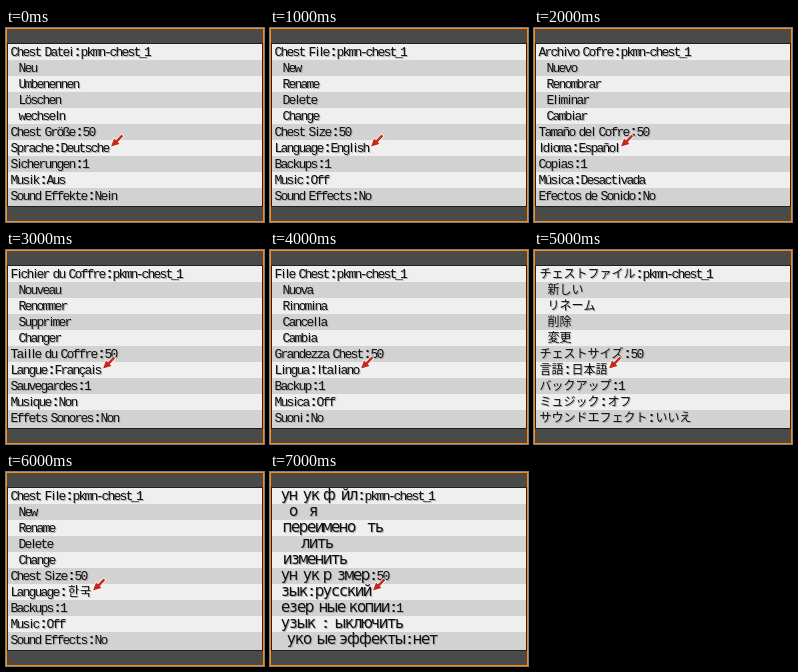
These frames come from a looping animation (258 px wide and 194 px high, 8000 ms). An HTML page with a canvas:

```html
<!DOCTYPE html>
<html lang="en">
<head>
<meta charset="utf-8">
<style>
  html, body { margin: 0; width: 100%; height: 100%; overflow: hidden; background: #4a4a4a; }
  canvas { display: block; width: 100vw; height: 100vh; }
</style>
</head>
<body>
<canvas id="stage" width="258" height="194"></canvas>
<script>
const ctx = document.getElementById('stage').getContext('2d');
const STEP = 1000, ROW = 16, LANGUAGE_ROW = 6;

const english = language => `Chest File:pkmn-chest_1
  New
  Rename
  Delete
  Change
Chest Size:50
Language:${language}
Backups:1
Music:Off
Sound Effects:No`;

// "~" is an empty cell, standing for a letter the menu font lacks.
const menus = [
`Chest Datei:pkmn-chest_1
  Neu
  Umbenennen
  Löschen
  wechseln
Chest Größe:50
Sprache:Deutsche
Sicherungen:1
Musik:Aus
Sound Effekte:Nein`,
english('English'),
`Archivo Cofre:pkmn-chest_1
  Nuevo
  Renombrar
  Eliminar
  Cambiar
Tamaño del Cofre:50
Idioma:Español
Copias:1
Música:Desactivada
Efectos de Sonido:No`,
`Fichier du Coffre:pkmn-chest_1
  Nouveau
  Renommer
  Supprimer
  Changer
Taille du Coffre:50
Langue:Français
Sauvegardes:1
Musique:Non
Effets Sonores:Non`,
`File Chest:pkmn-chest_1
  Nuova
  Rinomina
  Cancella
  Cambia
Grandezza Chest:50
Lingua:Italiano
Backup:1
Musica:Off
Suoni:No`,
`チェストファイル:pkmn-chest_1
  新しい
  リネーム
  削除
  変更
チェストサイズ:50
言語:日本語
バックアップ:1
ミュジック:オフ
サウンドエフェクト:いいえ`,
english('한국'),
`~ун~ук ф~йл:pkmn-chest_1
  ~о~~я
  переимено~~ть
  ~~~лить
  изменить
~ун~ук р~змер:50
~зык:русский
~езер~ные копии:1
~узык~:~ыключить
~~уко~ые эффекты:нет`
].map(menu => menu.split('\n'));

const MONO = '13px "Liberation Mono", monospace';
const SANS = '13px "Liberation Sans", sans-serif';
const BOLD = 'bold 14px "Liberation Sans", sans-serif';
const CYRILLIC = '15px "DejaVu Sans", sans-serif';
const CJK = '12px "Noto Sans CJK JP", "Noto Sans CJK KR", sans-serif';

// Cell width and font for each class of character; the first match wins.
const cells = [
  [/:/, 8, BOLD],
  [/[ilIí ]/, 4, SANS],
  [/[-_1]/, 5, MONO],
  [/ф/, 12, CYRILLIC],
  [/[ыю]/, 10, CYRILLIC],
  [/[а-я]/, 8, CYRILLIC],
  [/[\u3000-\uffff]/, 12, CJK],
  [/./, 6, MONO]
];

function drawLine(text, x, baseline) {
  for (const char of text) {
    const [, width, font] = cells.find(([pattern]) => pattern.test(char));
    if (char !== '~' && char !== ' ') {
      const center = x + (width - 1) / 2;
      ctx.font = font;
      ctx.fillStyle = '#a8a8a8';
      ctx.fillText(char, center + 1, baseline + 1);
      ctx.fillStyle = '#101010';
      ctx.fillText(char, center, baseline);
    }
    x += width;
  }
  return x;
}

function drawArrow(x, y) {
  const arrow = new Path2D(`M${x} ${y}l3 -8l2 1.8l5.5 -5.8l1.8 1.8l-5.5 5.8l1.7 1.9z`);
  ctx.strokeStyle = '#fff';
  ctx.lineWidth = 1.5;
  ctx.stroke(arrow);
  ctx.fillStyle = '#c42a1c';
  ctx.fill(arrow);
}

function box(color, x, y, width, height) {
  ctx.fillStyle = color;
  ctx.fillRect(x, y, width, height);
}

function drawBackground() {
  box('#ff8a10', 0, 0, 258, 194);
  box('#4a4a4a', 1, 1, 256, 192);
  box('#202020', 1, 15, 256, 164);
  box('#efefef', 2, 16, 254, 162);
  for (let row = 1; row < 10; row += 2) {
    box('#d2d2d2', 2, 16 + row * ROW, 254, row === 9 ? 18 : ROW);
  }
}

function drawMenu(lines) {
  drawBackground();
  ctx.textAlign = 'center';
  lines.forEach((line, row) => {
    const end = drawLine(line, 6, 28 + row * ROW);
    if (row === LANGUAGE_ROW) drawArrow(end + 1, 118.5);
  });
}

function frame() {
  drawMenu(menus[Math.floor(performance.now() / STEP) % menus.length]);
  requestAnimationFrame(frame);
}
frame();
</script>
</body>
</html>
```
